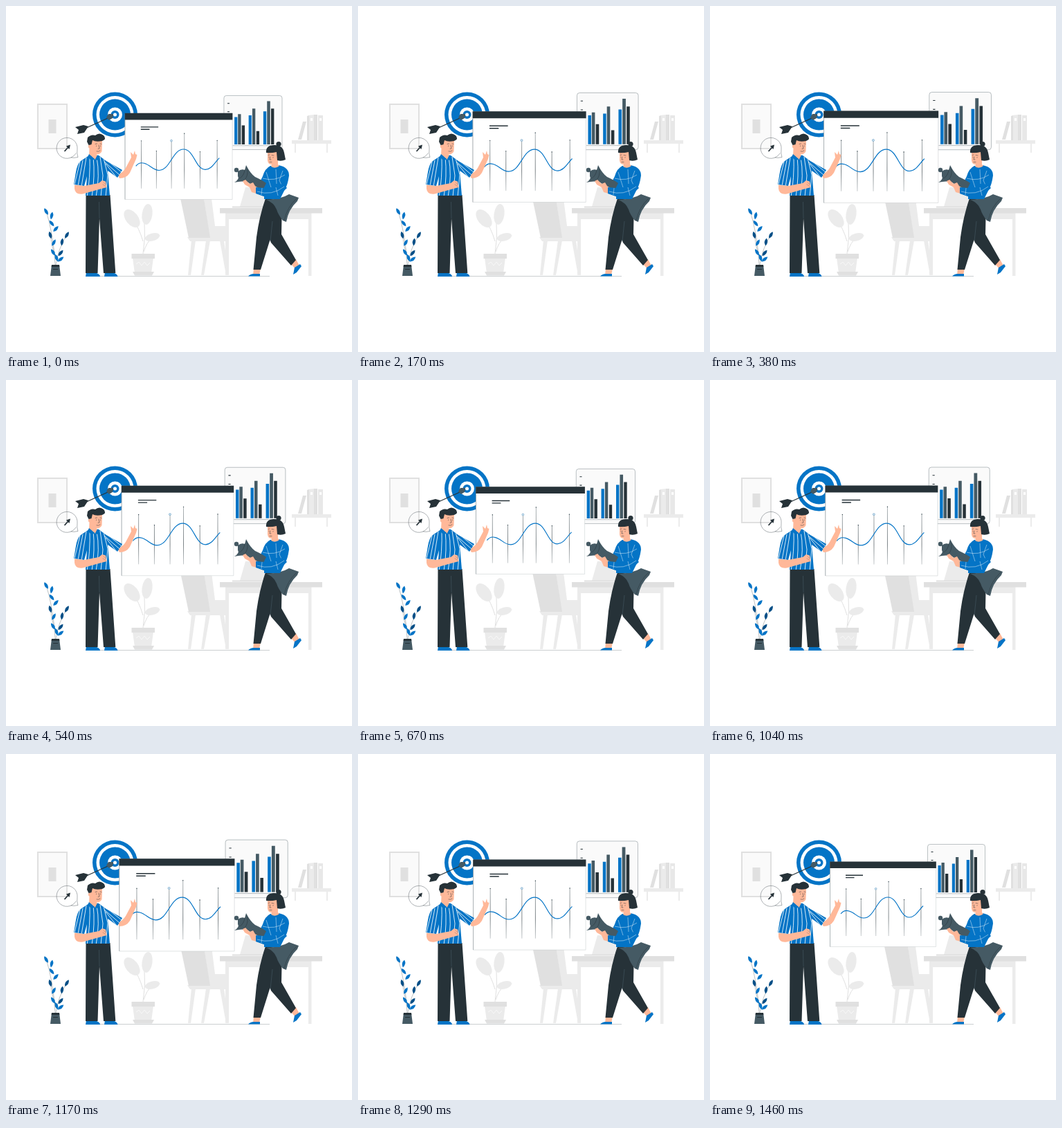
Recreate the animation shown at these times as an HTML page. Size 500x500 px, loop 1500 ms.

```html
<!DOCTYPE html>
<html lang="en">
<head>
<meta charset="utf-8">
<title>Business strategy presentation</title>
<style>
  html, body { margin: 0; width: 100%; height: 100%; overflow: hidden; background: #fff; }
  svg { display: block; width: 100vw; height: 100vh; }
  .blue { fill: #0474c6; }
  .navy { fill: #064f87; }
  .dark { fill: #263238; }
  .slate { fill: #455a64; }
  .skin { fill: #ffb899; }
  .white { fill: #fff; }
  .g2 { fill: #ebebeb; }
  .g3 { fill: #e0e0e0; }
  .line { fill: none; stroke: #263238; stroke-width: .5; stroke-linecap: round; stroke-linejoin: round; }
  .stripe { fill: none; stroke: #fff; stroke-width: .85; }
  .check { fill: none; stroke: #fff; stroke-width: .6; opacity: .75; }
</style>
</head>
<body>
<svg viewBox="0 0 500 500">
  <defs>
    <linearGradient id="fade" gradientUnits="userSpaceOnUse" x1="0" y1="184" x2="0" y2="264">
      <stop offset="0" stop-color="#90999d"/>
      <stop offset=".65" stop-color="#4c565b"/>
      <stop offset="1" stop-color="#b5bbbe"/>
    </linearGradient>
    <clipPath id="shirt">
      <path d="M120 216 108 224Q103 228 101 240L98 258 113 260 117 246 115 274H150L147 238 161 248 168 237 145 224 134 216Z"/>
    </clipPath>
    <path id="leaf" d="M0 5.500Q-4.500 0 0 -5.500Q4.500 0 0 5.500"/>
  </defs>

  <g id="room">
    <path class="g3" d="M45 141H89V207H45Z"/>
    <path fill="#fafafa" d="M47 143H87V205H47Z"/>
    <path class="g3" d="M61.500 164H72.500V184H61.500Z"/>

    <path class="g2" d="M413 194H470V199H413ZM417 199H419V212H417ZM463 199H465V212H463ZM436 158 446 157V194H436Z"/>
    <path class="g3" d="M429 167 434 167 427 193 422 193ZM435 159H438V194H435ZM445 157H450V194H445Z"/>
    <path fill="#e8e8e8" d="M451 158H458V194H451Z"/>
    <path class="white" d="M440 162H443V166H440ZM453 162H456V166H453Z"/>

    <path class="g2" d="M317 299H322V389H317ZM437 299H441.500V390H437ZM322 299H437V308H322Z"/>
    <path class="g3" d="M309 292H457V299.500H309Z"/>
    <path class="g2" d="M338 290 346 262H378L372 290Z"/>
    <path class="g3" d="M327 289.500H373V291.500H327Z"/>

    <path class="g2" d="M268 339H274L267 389H263ZM289 339H295L286 389H282ZM309 339H315L322 389H318Z"/>
    <path class="g2" d="M286 278H297L302 318H322V340H266L262 334H294Z"/>
    <path class="g3" d="M252 278H286L295 335H264Z"/>

    <path d="M198 358Q202 334 200 312M198 340Q192 320 184 310M199 355Q203 342 211 335" fill="none" stroke="#e0e0e0"/>
    <g class="g2">
      <ellipse cx="182" cy="307" rx="9" ry="15" transform="rotate(-38 182 307)"/>
      <ellipse cx="204" cy="301" rx="7.500" ry="15" transform="rotate(8 204 301)"/>
      <ellipse cx="211.500" cy="334" rx="11" ry="5.500" transform="rotate(-15 211.500 334)"/>
      <path d="M183 364H213L210 386H186Z"/>
    </g>
    <path class="g3" d="M181.500 358H215V365H181.500ZM183 384H214L211 389.500H186Z"/>
    <path d="M188 373l4-3 4 5 4-5 4 5 4-4" fill="none" stroke="#f8f8f8"/>
  </g>

  <path d="M115 390.500H381" stroke="#b5bbbe" stroke-width=".7"/>

  <g id="target">
    <circle class="blue" cx="157.500" cy="157" r="32.500"/>
    <circle class="white" cx="157.500" cy="157" r="27"/>
    <circle class="blue" cx="157.500" cy="157" r="22.500"/>
    <circle class="white" cx="157.500" cy="157" r="10.500"/>
    <circle class="blue" cx="157.500" cy="157" r="6"/>
    <circle class="white" cx="157.500" cy="157" r="2.500"/>
    <path d="M112 178 155 158.500" stroke="#263238" stroke-width="1.200"/>
    <path class="slate" d="M145 161 148 156 155 156 154 162 149 165Z"/>
    <path class="dark" d="M119 174 112 172 100 175 105 179 103 185 113 183Z"/>
  </g>

  <g id="boards">
    <rect x="314.500" y="130.500" width="83" height="77" rx="3.500" fill="#fafafa" stroke="#7d888d" stroke-width=".5"/>
    <path d="M327 201.800H388" stroke="#7d888d" stroke-width=".5"/>
    <path d="M319.500 141.500h3M319.500 153.500h3" stroke="#263238" stroke-width="1"/>
    <path class="blue" d="M329.500 200V161h4.200V200ZM349.800 200V158.500H354V200ZM370.700 200V153h4.300V200Z"/>
    <path class="slate" d="M334.500 200V157h4.300V200ZM355 200V149h4.300V200ZM376 200V138.500h4.500V200Z"/>
    <path class="dark" d="M340 200V173h4.300V200ZM360.800 200V181H365V200ZM381.700 200V149H386V200Z"/>

    <path class="white" d="M173.500 156H326.500V278.500H173.500Z" stroke="#c5cacc" stroke-width=".5"/>
    <path d="M173.500 165V278.500" stroke="#7d888d" stroke-width=".5"/>
    <path class="dark" d="M173.200 155.500H326.800V165H173.200Z"/>
    <path d="M196 175.300H221M196 178.600H208.500" stroke="#263238" stroke-width="1.400"/>
    <path d="M196.700 195V263M218.300 209V263M239.700 196V263M258.100 184V263M280.500 210V263M304.900 194V263" stroke="url(#fade)" stroke-width=".7"/>
    <path d="M196.700 195h0M218.300 209.500h0M258.100 184.500h0M280.500 210.500h0M304.900 194.500h0" stroke="#37474f" stroke-width="1.300" stroke-linecap="round"/>
    <circle cx="239.600" cy="194.800" r="1.400" fill="#dcebf6" stroke="#4285b5" stroke-width=".5"/>
    <path d="M189 231C192 227 196 225.500 201 227C210 229.500 213 237 222 237C238 237 241 207 257 207C272 207 274 236 288 236C297 236 302 225 308 219.500" fill="none" stroke="#0474c6" stroke-width="1.100"/>
  </g>

  <g id="clock">
    <path class="line" stroke-opacity=".75" d="M101 213A15 15 0 1 1 103 207Q102 213 104 218.500Q98 220 94 219"/>
    <path d="M84.500 210 90 204" stroke="#263238" stroke-width="1.800"/>
    <path class="dark" d="M93 200.500 91.500 207 87 202.500Z"/>
  </g>

  <g id="plant">
    <path class="line" stroke-opacity=".6" d="M71 374Q69 330 57 293M70 360Q66 346 64 329M72 374Q75 350 90 328"/>
    <g class="blue">
      <use href="#leaf" transform="translate(58 297) rotate(-30)"/>
      <use href="#leaf" transform="translate(66 303) rotate(12)"/>
      <use href="#leaf" transform="translate(66 314) rotate(-38)"/>
      <use href="#leaf" transform="translate(72 322) rotate(42)"/>
      <use href="#leaf" transform="translate(69 342) rotate(28)"/>
      <use href="#leaf" transform="translate(68 356) rotate(-32)"/>
      <use href="#leaf" transform="translate(73 364) rotate(-20)"/>
      <use href="#leaf" transform="translate(79 366) rotate(52)"/>
    </g>
    <g class="navy">
      <use href="#leaf" transform="translate(64 331) rotate(-15)"/>
      <use href="#leaf" transform="translate(79 357) rotate(40)"/>
      <use href="#leaf" transform="translate(81 341) rotate(8)"/>
      <use href="#leaf" transform="translate(88 331) rotate(30)"/>
    </g>
    <path class="slate" d="M66 374H77L79 390H64Z"/>
    <path class="dark" d="M66 374H77L77.300 377H65.700ZM68 380H75V381H68Z"/>
  </g>

  <g id="man">
    <path class="blue" d="M116 385H128Q136 387 136 391H115ZM143 385H154Q161 387 161.500 391H142Z"/>
    <path class="dark" d="M115.500 273H150.500L158.300 386H141L135 307 132.500 386H115Z"/>
    <path d="M135 307 134.500 283" stroke="#455a64" stroke-width=".6"/>
    <path class="skin" d="M161 244Q169 241 173 234L181 219 180 211 184 215 186 209 187 214 189.500 215 188 221 179 241Q174 249 164 249Z"/>
    <path class="skin" d="M121 194H139L138.500 210Q136 215 131 214L132 218Q126 222 120 217Z"/>
    <path class="dark" d="M117 196 118 190Q123 185 129 187Q135 182 141 187Q146 192 139 195Q130 197 125 194L123.500 200 120 202Z"/>
    <circle class="skin" cx="121.500" cy="203" r="2.600"/>
    <path class="line" d="M129 199.500 131.500 199M136 199 138 199.500M130.500 202v.6M136.500 202v.6M134 201 135 206 133 206.500M131 210Q134 211 136 209"/>
    <g clip-path="url(#shirt)">
      <path class="blue" d="M90 210H172V276H90Z"/>
      <path class="stripe" d="M107 225 99 258M111 223 104 260M116 219 109 261M121 217Q122 248 117 276M126 218Q129 245 124 276M131 219Q136 244 130 276M136 218 140 245 137 276M141 220 147 244 144 276M142 225 164 244M144 228 160 248M147 224 167 240"/>
    </g>
    <path class="skin" d="M122 216 132 215 129 222Z"/>
    <path class="blue" d="M120 214 128 221 124 224 118 218ZM133 215 135 220 131 223 129 221Z"/>
    <path class="skin" d="M99 258.500 113 260 134 256 139 252 144 253.500 145.500 262 138 264 111 271.500Q100 273 99 264Z"/>
    <path class="line" d="M141 255 144 258M140 258 144 260.500" opacity=".5"/>
  </g>

  <g id="woman">
    <path class="skin" d="M358 379H368L366 389H357ZM412 373 419 366 425 377 420 382Z"/>
    <path class="blue" d="M350 390.500Q353 387 358 387L367 387 367 390.500ZM417 378 425 373 427 376 420 385 415 388Z"/>
    <path class="dark" d="M375 278 399 281 398 330 419 367 412 375 383 342 381.500 338 368 381H357.500L362 334Q366 304 375 278Z"/>
    <path d="M385 311 382 340" stroke="#455a64" stroke-width=".6"/>
    <path class="slate" d="M376 280Q398 279 409 272L423 277 421 282Q408 294 405 312L400 310Q393 301 391 294 387 284 376 280Z"/>
    <path d="M420 278Q406 291 402 310" fill="none" stroke="#37474f"/>
    <path class="blue" d="M382 231 394 230Q409 233 409 245Q407 259 403 265L396 279 373 279 373 275 362 271 364 260 371 246Q374 235 382 231Z"/>
    <path class="check" d="M371 249Q388 254 403 244M376 240 383 262M390 236 391 257M400 238 395 252 401 265"/>
    <circle class="slate" cx="333" cy="237" r="3.200"/>
    <path class="slate" d="M335 239Q340 235 345 237L347 230Q353 242 360 247 371 252 376 256L372 264Q358 262 350 255 342 252 330 255 338 250 335 246Z"/>
    <path class="line" d="M345 237Q344 245 338 249M349 236Q350 247 344 252"/>
    <path class="skin" d="M342 253 346 251 352 257 357 255 360 260 365 264 362 271 355 269 352 262 345 258Z"/>
    <path class="blue" d="M361 262 386 264 400 256 406 263 392 276 378 277 361 271Z"/>
    <path class="check" d="M370 263 369 273M390 262 393 274M363 268Q384 275 402 261"/>
    <path class="skin" d="M378 209H393V229L395 231Q389 236 383 232L384 229Q377 230 378 218Z"/>
    <circle class="dark" cx="394" cy="199.500" r="3.600"/>
    <path class="dark" d="M376 212Q375 202 386 201Q400 200 402 212L404 222Q398 225 392 223L391 211Q383 213 376 212Z"/>
    <path class="line" d="M379 215.500 381 215M384 215.500 387 216M380 218v.7M386 218.500v.7M382 218 381 222H383M381 225.500H384"/>
  </g>
</svg>
<script>
  const boards = document.getElementById("boards");
  const LOOP = 1500, FRAMES = 36, CX = 285.5, CY = 204.5;
  // [time in ms, scale] of the double pulse
  const pulse = [[0, 1], [308, 1.1], [855, 1], [1165, 1.1], [LOOP, 1]];

  function scaleAt(ms) {
    const i = pulse.findIndex(([end]) => ms <= end) || 1;
    const [t0, s0] = pulse[i - 1], [t1, s1] = pulse[i];
    return s0 + (s1 - s0) * (ms - t0) / (t1 - t0);
  }

  function draw() {
    const step = Math.floor(performance.now() % LOOP / LOOP * FRAMES);
    const s = scaleAt((step + 1) * LOOP / FRAMES);
    boards.setAttribute("transform", `translate(${CX} ${CY}) scale(${s}) translate(${-CX} ${-CY})`);
    requestAnimationFrame(draw);
  }
  draw();
</script>
</body>
</html>
```
